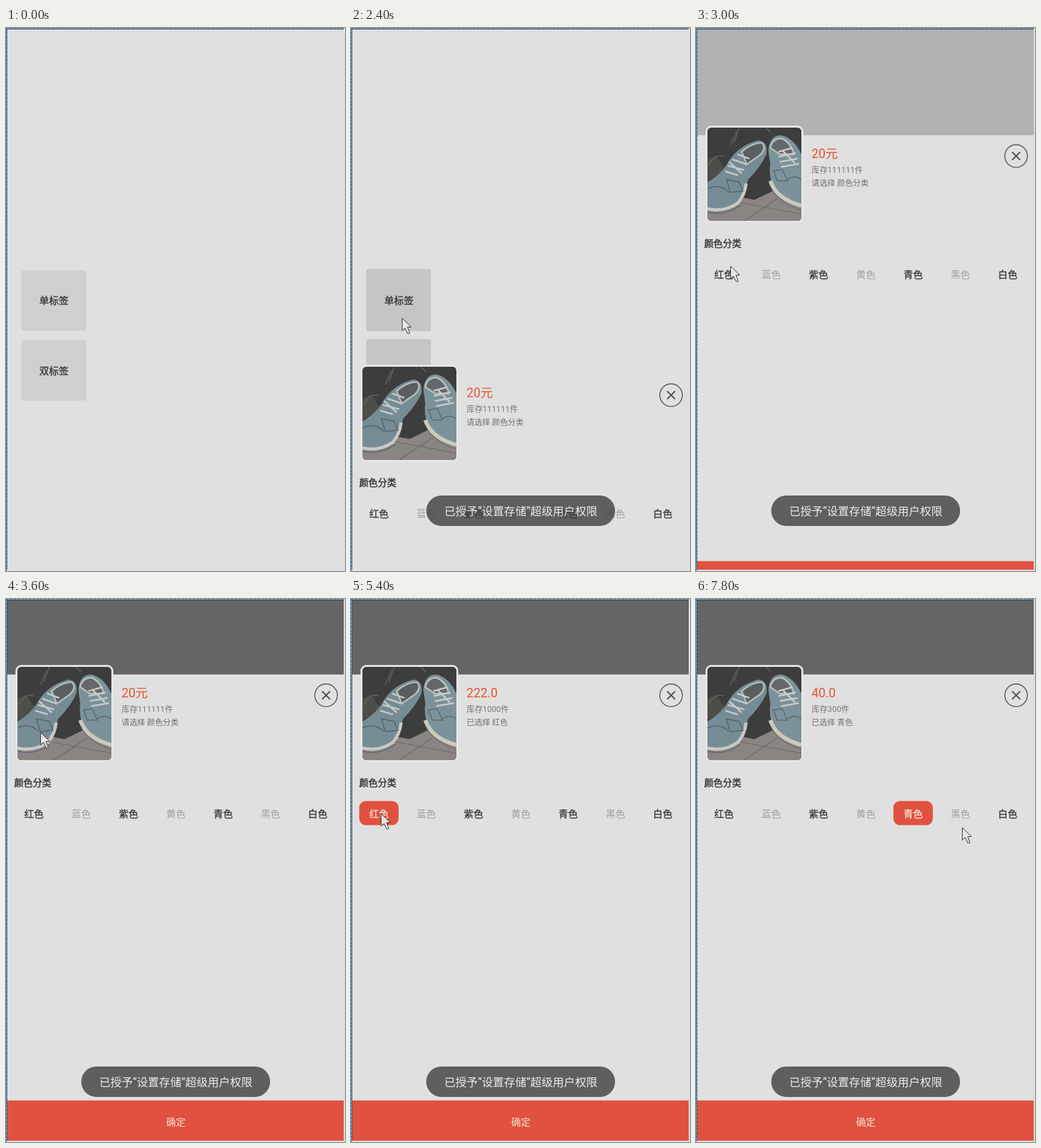
Animation of 534x856 px, one loop 8000 ms. Source, as an HTML page with a canvas:

```html
<!DOCTYPE html>
<html lang="zh-CN">
<head>
<meta charset="utf-8">
<style>
html, body { margin: 0; width: 100%; height: 100%; overflow: hidden; background: #e0e0e0; }
canvas { display: block; }
</style>
</head>
<body>
<canvas id="stage" width="534" height="856"></canvas>
<script>
const ctx = document.getElementById('stage').getContext('2d');
const LOOP = 8000, STEP = 300;
const BG = '#e0e0e0', RED = '#e0523f', INK = '#383838', CREAM = '#f4e3cc';
const FONT = 'Roboto, "Noto Sans CJK SC", "Noto Sans CJK", sans-serif';
const COLORS = ['红色', '蓝色', '紫色', '黄色', '青色', '黑色', '白色'];

// Sheet contents from each moment on: time, chip, price, stock, choice
const PICKS = [
  [0, -1, '20元', '库存111111件', '请选择 颜色分类'],
  [5400, 0, '222.0', '库存1000件', '已选择 红色'],
  [6600, 2, '100.0', '库存500件', '已选择 紫色'],
  [7500, 4, '40.0', '库存300件', '已选择 青色']
];
const POINTER = [
  [900, 98, 500], [1200, 83, 457], [1800, 83, 457], [2400, 80, 457],
  [2700, 66, 430], [3000, 54, 375], [3600, 54, 210], [3900, 54, 199],
  [4500, 54, 199], [5100, 47, 335], [5400, 47, 338], [6300, 200, 341],
  [6600, 200, 341], [7200, 335, 346], [7500, 345, 346], [7800, 419, 360]
];
const TOAST = [[900, 0], [1500, 0.78], [1800, 1], [4800, 1], [5100, 0.4], [5400, 1]];

const clamp = v => Math.max(0, Math.min(1, v));

function track(keys, t, col) {
  if (t <= keys[0][0]) return keys[0][col];
  for (let i = 1; i < keys.length; i++) {
    const a = keys[i - 1], b = keys[i];
    if (t <= b[0]) return a[col] + (b[col] - a[col]) * (t - a[0]) / (b[0] - a[0]);
  }
  return keys[keys.length - 1][col];
}

function rect(x, y, w, h, color) {
  ctx.fillStyle = color;
  ctx.fillRect(x, y, w, h);
}

function round(x, y, w, h, r, color) {
  ctx.beginPath();
  ctx.roundRect(x, y, w, h, r);
  ctx.fillStyle = color;
  ctx.fill();
}

// heavy: extra outline in px, between regular and bold
function text(str, x, y, size, color, align = 'left', heavy = 0) {
  ctx.font = `${size}px ${FONT}`;
  ctx.textAlign = align;
  ctx.fillStyle = ctx.strokeStyle = color;
  ctx.fillText(str, x, y + size * 0.37);
  if (heavy) {
    ctx.lineWidth = heavy;
    ctx.strokeText(str, x, y + size * 0.37);
  }
}

function shape(path, fill, stroke, width = 1) {
  const p = new Path2D(path);
  if (fill) { ctx.fillStyle = fill; ctx.fill(p); }
  if (stroke) { ctx.strokeStyle = stroke; ctx.lineWidth = width; ctx.stroke(p); }
}

function photo(x, y) {
  ctx.save();
  ctx.translate(x, y);
  ctx.beginPath();
  ctx.roundRect(0, 0, 148, 147, 6);
  ctx.clip();
  rect(0, 0, 148, 147, '#3c3d3c');
  shape('M0 50L14 44L24 60L34 66L0 84Z', '#4d4e49');
  shape('M2 60Q12 40 26 46M36 28L46 6M50 0L42 24M100 8L92 0', null, '#6d6c62', 1.2);
  shape('M0 147V124L60 108L100 94L148 112V147Z', '#8a8482');
  shape('M50 118L148 136M58 147L110 112', null, '#6c6766', 1.2);
  shape('M54 110L80 66L97 58L107 98L74 114Z', '#3c3d3d');
  // left shoe
  shape('M0 86Q24 72 34 52Q50 28 80 20Q96 22 93 42Q84 62 64 82Q60 106 46 120Q24 132 0 126Z', '#768c95');
  shape('M0 128Q26 134 48 119Q59 106 61 88', null, '#c9c9c3', 5);
  shape('M0 133Q28 140 52 122', null, '#566577', 1.5);
  shape('M54 38Q70 24 86 24Q94 33 82 44Q70 52 62 58Z', '#595e60', '#b9bdbc', 2.5);
  shape('M28 69L48 75M32 60L58 67M39 50L62 58M47 42L66 49M34 54L54 72', null, '#c6cac9', 2.5);
  shape('M30 82L50 86L56 100L36 102ZM0 96Q20 88 34 102', null, '#50626b', 1.5);
  // right shoe
  shape('M96 36Q98 12 116 12Q136 16 148 42V126Q120 120 104 96Q96 74 99 58Z', '#7c929a');
  shape('M99 84Q108 112 148 123', null, '#cdcabc', 6);
  shape('M99 92Q110 118 148 130', null, '#6a7070', 1.2);
  shape('M99 32Q102 17 117 17Q132 24 136 42L114 42Z', '#63686a', '#bcc0be', 2.5);
  shape('M112 38L134 32M112 46L139 40M114 54L142 49M116 62L144 57M118 36L138 56', null, '#c8ccca', 2.5);
  shape('M104 68L118 66L126 84L110 84ZM126 82Q138 74 148 82', null, '#55686f', 1.5);
  ctx.restore();
}

function buttons(t) {
  const pressed = t >= 2100;
  const top = pressed ? 380 : 382, size = pressed ? 98 : 95;
  ['单标签', '双标签'].forEach((label, i) => {
    round(24, top + i * 110.5, 102, size, 3, pressed ? '#c5c5c5' : '#d0d0d0');
    text(label, 75.5, 429.5 + i * 110.5, 15.3, INK, 'center', 0.4);
  });
}

function sheet(t) {
  const p = clamp((t - 2114) / 1198);
  if (!p) return;
  const shift = 737 * (1 - p) ** 2;
  const [, chosen, price, stock, choice] = PICKS.filter(s => t >= s[0]).pop();
  ctx.save();
  ctx.translate(0, Math.round(shift));
  rect(2, 119, 530, 737, BG);
  round(15, 104, 154, 153, 9, '#e7e7e7');
  photo(18, 107);
  text(price, 182, 147.5, 19.5, '#e2552f');
  text(stock, 182, 173, 12.7, '#777');
  text(choice, 182, 194.5, 12.4, '#707070');
  ctx.beginPath();
  ctx.arc(504.2, 151.8, 17.8, 0, Math.PI * 2);
  ctx.strokeStyle = '#505050';
  ctx.lineWidth = 1.4;
  ctx.stroke();
  shape('M498 145.5L510.5 158M510.5 145.5L498 158', null, '#484848', 1.9);
  text('颜色分类', 13, 289.5, 14.6, INK, 'left', 0.5);
  COLORS.forEach((name, i) => {
    const x = 44 + i * 74.5, on = i === chosen, off = i % 2;
    if (on) round(x - 31, 318.5, 62, 38, 10, RED);
    text(name, x, 338, 15.3, on ? CREAM : off ? '#a0a0a0' : INK, 'center', off ? 0 : 0.3);
  });
  rect(2, 790.5, 530, 64, RED);
  text('确定', 267.5, 824, 15.3, CREAM, 'center');
  ctx.restore();
}

function toast(t) {
  ctx.globalAlpha = track(TOAST, t, 1);
  round(118.5, 737, 297.5, 48, 24, 'rgba(68,68,68,.82)');
  text('已授予“设置存储”超级用户权限', 267.5, 761.5, 17.6, '#ececec', 'center');
  ctx.globalAlpha = 1;
}

function pointer(t) {
  if (t < POINTER[0][0]) return;
  ctx.save();
  ctx.translate(Math.round(track(POINTER, t, 1)) + 0.5, Math.round(track(POINTER, t, 2)) + 0.5);
  shape('M0 0V19.5L4.5 15.5L9 24.5L12 23.5L8.5 14H14.5Z', '#e6e6e6', '#333');
  ctx.restore();
}

function border() {
  const gap = '#a9cbe2', dash = '#4a92c8';
  rect(0, 0, 532, 1, gap);
  rect(0, 0, 1, 854, gap);
  for (let i = 0; i < 854; i += 6) {
    if (i < 532) rect(i, 0, 4, 1, dash);
    rect(0, i, 1, 4, dash);
  }
  rect(1, 1, 531, 1, '#4a5058');
  rect(1, 1, 1, 853, '#2b5478');
  rect(2, 2, 530, 1, 'rgba(0,0,0,.14)');
}

function draw(t) {
  rect(0, 0, 534, 856, BG);
  ctx.save();
  ctx.beginPath();
  ctx.rect(2, 1, 530, 853);
  ctx.clip();
  buttons(t);
  const dim = 0.55 * clamp((t - 2400) / 1200) ** 1.4;
  rect(2, 1, 530, 853, `rgba(0,0,0,${dim})`);
  sheet(t);
  toast(t);
  pointer(t);
  ctx.restore();
  border();
}

function frame() {
  const now = performance.now() % LOOP;
  draw(now < 600 ? 0 : Math.floor(now / STEP) * STEP);
  requestAnimationFrame(frame);
}
frame();
</script>
</body>
</html>
```
